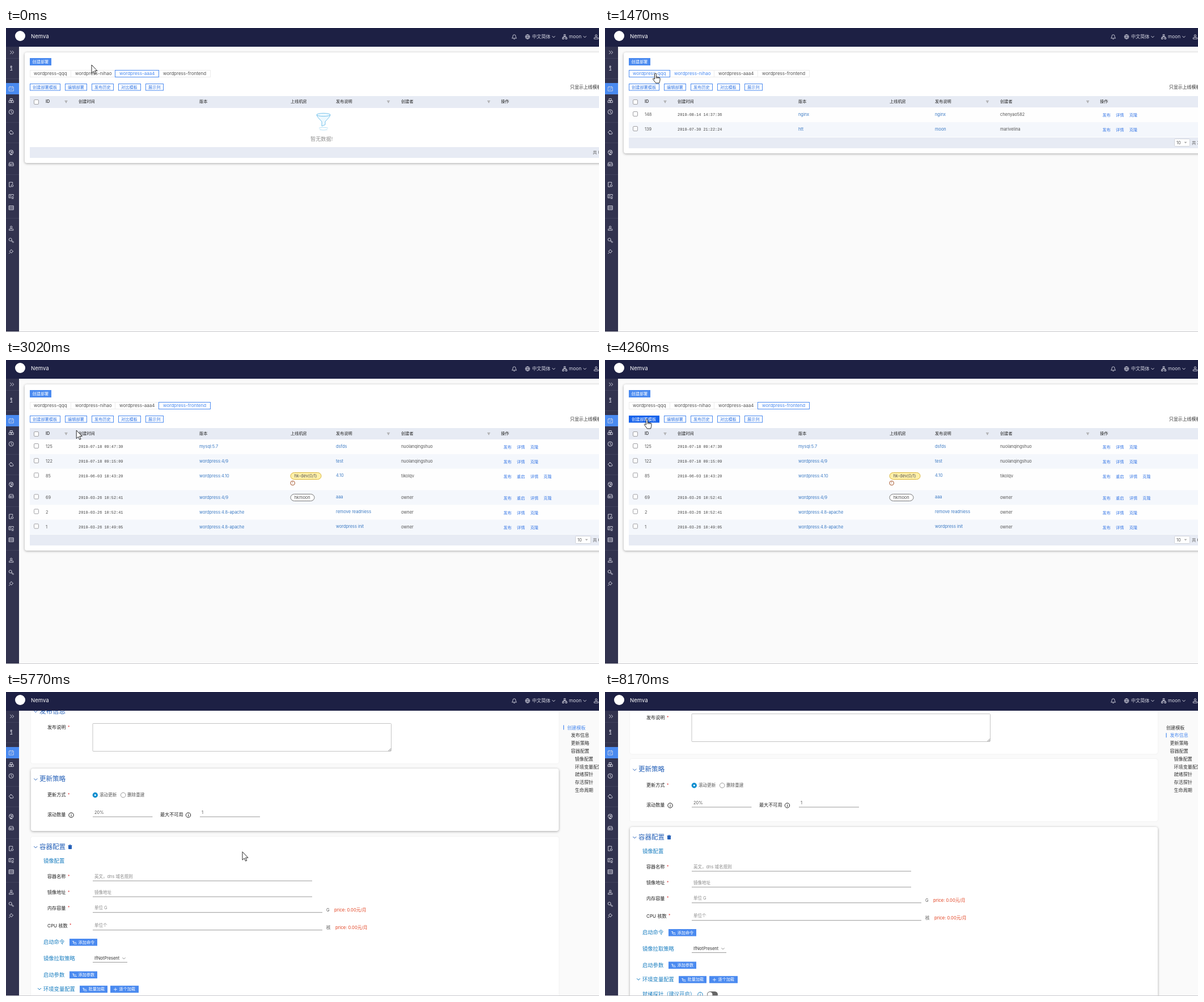
Animation, 1046 px wide and 536 px high, one loop 8.64 s. Source, as an HTML page:

```html
<!DOCTYPE html>
<html lang="en">
<head>
<meta charset="utf-8">
<style>
html, body { margin: 0; width: 100%; height: 100%; overflow: hidden; background: #fafafa }
svg { display: block; width: 1046px; height: 536px; font-family: Inter, 'Noto Sans CJK SC', 'Noto Sans CJK', sans-serif }
.mono { font-family: 'Liberation Mono', monospace }
.lift { filter: drop-shadow(0 1px 2px #0005) }
.flat { filter: drop-shadow(0 0 1px #0001) }
</style>
</head>
<body>
<svg id="stage" viewBox="0 0 1046 536"></svg>
<script>
const LOOP = 8640, BLUE = '#4a8af0', LINK = '#3d7bc4', HEAD = '#e7ebf4';
const stage = document.getElementById('stage');

// Text is placed by its left edge and vertical centre.
const text = (x, y, s, size = 7.4, fill = '#565656', extra = '') =>
  `<text x="${x}" y="${y + size * .36}" font-size="${size}" fill="${fill}" ${extra}>${s}</text>`;
const rect = (x, y, w, h, fill, extra = '') =>
  `<rect x="${x}" y="${y}" width="${w}" height="${h}" fill="${fill}" ${extra}/>`;
const box = (x, y, w, h, stroke, fill = '#fff', r = 0) =>
  rect(x + .5, y + .5, w - 1, h - 1, fill, `stroke="${stroke}" rx="${r}"`);
const circle = (x, y, r, fill, stroke = 'none') =>
  `<circle cx="${x}" cy="${y}" r="${r}" fill="${fill}" stroke="${stroke}"/>`;
const line = (x, y, x2, stroke = '#9a9a9a') => rect(x, y, x2 - x, 1, stroke);
const icon = (x, y, d, stroke = '#d8d9e4', width = .9, fill = 'none') =>
  `<path transform="translate(${x} ${y})" d="${d}" fill="${fill}" stroke="${stroke}" stroke-width="${width}"/>`;
const chevron = (x, y, color, s = 3) => icon(x, y, `M${-s} ${-s / 2}L0 ${s / 2}L${s} ${-s / 2}`, color, 1);
const ring = r => `M${-r} 0a${r} ${r} 0 1 0 ${2 * r} 0a${r} ${r} 0 1 0 ${-2 * r} 0`;

// Bursts of motion: start, end, number of pictures.
const bursts = [[380, 1220, 12], [1310, 2160, 12], [2250, 2470, 4], [2780, 3330, 8], [3560, 3940, 6],
  [4110, 4260, 2], [4490, 5290, 11], [5510, 5980, 7], [6610, 7460, 12], [7550, 8170, 9]];
const pointer = [[0, 151, 65], [380, 150, 67], [700, 140, 82], [1220, 92, 84], [1310, 89, 80], [1470, 89, 80],
  [1750, 150, 70], [2160, 312, 80], [2470, 312, 80], [2780, 285, 84], [3016, 124, 124], [3330, 70, 156],
  [3560, 70, 152], [3940, 71, 104], [4490, 76, 104], [4650, 181, 98], [5290, 417, 281], [6610, 417, 283],
  [7460, 412, 352], [7550, 440, 360], [8170, 1040, 545]];
const scrolling = [[5432, 0], [5510, 6], [5745, 62], [5980, 79]];

function snap(t) {
  let at = 0;
  for (const [start, end, n] of bursts) if (t >= start) {
    const step = (end - start) / (n - 1);
    at = start + Math.min(Math.floor((t - start) / step), n - 1) * step;
  }
  return at;
}
function sample(keys, t) {
  const i = keys.findIndex(k => k[0] > t);
  if (i === 0) return keys[0].slice(1);
  if (i < 0) return keys.at(-1).slice(1);
  const a = keys[i - 1], b = keys[i], u = (t - a[0]) / (b[0] - a[0]);
  return a.slice(1).map((v, j) => v + (b[j + 1] - v) * u);
}

const sideIcons = [
  [43, 'M-2-3L1 0L-2 3M1.5-3L4.5 0L1.5 3'],
  [71, 'M-1-4h2v2h-2zM-1.5-1H.7V3M-2 3.5h4'],
  [107, 'M-4-3h8v7h-8zM-2-4.5v2M2-4.5v2M-2 0L-.5 1.5L2.5-1'],
  [128, 'M-2-3.5h4v3.5h-4zM-4 0h4v3.5h-4zM0 0h4v3.5h-4z'],
  [148, ring(4) + 'M0-2.5V.5L2 1.5'],
  [184, 'M-2 3h5q2-2-.5-3.5q-1-3-3.5-2M-4 0L0-4M-4 0L0 3.5'],
  [219, ring(3.7) + 'M-3-2L3 1M2-3L-1 3M-2 4.5h4'],
  [240, 'M-4 0L-3-3h6l1 3v3h-8zM-4 0h8M-2 1.6h2'],
  [276, 'M2.5-1v-3h-6v8H0M0 2a1.8 1.8 0 1 0 3.6 0a1.8 1.8 0 1 0-3.6 0'],
  [297, 'M4-1v-2.5h-8v6h4M-2.5-1.5h3M-2.5.5h2M1 1.5a1.5 1.5 0 1 0 3 0a1.5 1.5 0 1 0-3 0M1.5 3v1.5M3.5 3v1.5'],
  [317, 'M-4-3.5h8v7h-8zM-4-1.2h8M-4 1.2h8'],
  [353, 'M-1.7-2a1.7 1.7 0 1 0 3.4 0a1.7 1.7 0 1 0-3.4 0M-3.7 3.7v-1.2q0-1.5 1.5-1.5h4.4q1.5 0 1.5 1.5v1.2z'],
  [374, 'M-4-1a2.5 2.5 0 1 0 5 0a2.5 2.5 0 1 0-5 0M1 .5L4.5 3.5L3.5 4.5L0 1.5'],
  [394, 'M0-3.5L3.5 0L2 .5L.5 3L-3-.5L-.5-2zM-1.5 1.5L-4 4']];

const chrome = () => rect(0, 33, 23, 503, '#32334f') + rect(0, 97, 23, 20, BLUE) +
  [53, 89, 166, 202, 258, 335].map(y => line(0, y, 23, '#41425d')).join('') +
  sideIcons.map(([y, d]) => icon(9.2, y, d)).join('') +
  rect(0, 0, 1046, 33, '#1d2044') + circle(25, 14, 9, '#fff') + text(44, 15, 'Nemva', 9.5, '#fff') +
  icon(896.5, 15.5, 'M-4 2.5Q-2.5 1-2.5-1a2.5 2.7 0 0 1 5 0Q2.5 1 4 2.5zM-1 4h2') +
  icon(920, 15.5, ring(3.8) + 'M-3.8 0h7.6M0-3.8Q-3.4 0 0 3.8Q3.4 0 0-3.8') +
  text(928, 15.5, '中文简体', 8.1, '#d8d9e4') + chevron(966, 15.5, '#d8d9e4', 2.5) +
  icon(985.5, 15.5, 'M-1.3-4h2.6v2.6h-2.6zM-4 1.4h2.6v2.6h-2.6zM1.4 1.4h2.6v2.6h-2.6zM0-1.4V0M-2.7 1.4V0h5.4v1.4') +
  text(993, 15, 'moon', 8.3, '#d8d9e4') + chevron(1021, 15.5, '#d8d9e4', 2.5) +
  icon(1041, 15.5, sideIcons[11][1]) + line(0, 535, 1046, '#c9c9cd');

// Row: centre, height, id, time, version, note, creator, can restart.
const shortRows = [[153, 26, 148, '2019-08-14 14:37:36', 'nginx', 'nginx', 'chenyao582'],
  [179, 26, 139, '2019-07-30 21:22:24', 'htt', 'moon', 'marivelina']];
const longRows = [[153, 26, 125, '2019-07-18 09:47:30', 'mysql:5.7', 'dsfds', 'nuolanqingshuo'],
  [179, 26, 122, '2019-07-18 09:15:09', 'wordpress:4/9', 'test', 'nuolanqingshuo'],
  [204.5, 38, 85, '2019-06-03 18:43:20', 'wordpress:4.10', '4.10', 'tikolqv', 1],
  [242.5, 26, 69, '2019-03-26 10:52:41', 'wordpress:4/9', 'aaa', 'owner', 1],
  [268.5, 26, 2, '2019-03-26 10:52:41', 'wordpress:4.8-apache', 'remove readniess', 'owner'],
  [294.5, 26, 1, '2019-03-26 10:49:05', 'wordpress:4.8-apache', 'wordpress init', 'owner']];

const check = y => box(49, y, 9, 9, '#a0a0a4', '#fff', 1.5);
const filter = x => icon(x, 130, 'M-2.3-1.7h4.6L.6.3V2L-.6 1.5V.3z', '#999', .6, '#bbb');

function tableRow([y, h, id, time, version, note, creator, restart], i) {
  const ops = restart ? ['发布', '重启', '详情', '克隆'] : ['发布', '详情', '克隆'];
  return rect(42, y - 13, 1004, h, i % 2 ? '#f4f7fc' : '#fefefe') + check(y - 6) +
    text(70, y - .3, id) + text(128, y, time, 6.88, '#444', 'class="mono"') +
    text(341, y - .3, version, 7.4, LINK) + text(582, y - .8, note, 7.4, LINK) + text(697, y - .3, creator) +
    ops.map((s, j) => text(877.5 + j * 23.6, y + .5, s, 7.2, '#3b7ae6')).join('');
}

function listScene(t) {
  const rows = t < 1310 ? [] : t < 2250 ? shortRows : longRows;
  const foot = [210, 193, 308][rows === longRows ? 2 : rows.length ? 1 : 0];
  const active = t < 1200 ? 2 : t < 2100 ? 0 : 3;
  const edges = [42, 115, 193, 270, 361];
  let s = rect(33, 43, 1030, foot - 15, '#fff', 'rx="4" class="lift"') +
    rect(42, 53, 38, 13, BLUE) + text(46.5, 59.2, '创建部署', 7.2, '#fff', 'font-weight="500"');
  const tab = (name, i) => box(edges[i] - (i && 1), 74, edges[i + 1] - edges[i] + (i && 1), 13, i === active ? BLUE : '#ececec') +
    text(edges[i] + 7, 80.3, 'wordpress-' + name, 8.06, i === active || i === 1 && t > 600 && t < 1800 ? BLUE : '#555');
  const names = ['qqq', 'nihao', 'aaa4', 'frontend'];
  s += names.map((n, i) => i === active ? '' : tab(n, i)).join('') + tab(names[active], active);
  [[42, 54, '创建部署模板'], [104, 39, '编辑部署'], [151, 39, '发布历史'], [198, 40, '对比模板'], [246, 32, '展示列']]
    .forEach(([x, w, label], i) => {
      const on = !i && t > 3900;
      s += box(x, 98, w, 12.5, on ? '#1763ec' : BLUE, on ? '#1763ec' : '#fff') +
        text(x + 5, 104.3, label, 7.2, on ? '#fff' : '#2f74e4');
    });
  s += text(995, 104.5, '只显示上线模板', 7.9, '#333') + rect(42, 120, 1004, 21, HEAD) + check(126) +
    [[70, 'ID'], [128, '创建时间'], [341, '版本'], [502, '上线机房'], [582, '发布说明'], [697, '创建者'], [873, '操作']]
      .map(([x, h]) => text(x, 129.2, h, 7.2, '#222', 'font-weight="500"')).join('') +
    [106, 674.5, 851.5].map(filter).join('') + rows.map(tableRow).join('');
  if (!rows.length)
    s += icon(560, 165, 'M-12-12Q-12-9-3 0V8L3 5.5V0Q12-9 12-12M-12-12a12 2.7 0 1 0 24 0a12 2.7 0 1 0-24 0', '#79c4ec', 1, '#edf8fe') +
      icon(560, 178, 'M-8-1.5Q0-4 8-1.5M-7 1Q0 3 7 1', '#b9e2f6', 1.2) + text(537, 196, '暂无数据!', 9.2, '#929292');
  if (rows === longRows)
    s += box(501.5, 198, 55, 13, '#d9b63c', '#fff0a8', 6.5) + text(508.5, 204.2, 'hk-dev(0/1)', 7.4) +
      circle(505.7, 217, 3.8, '#fff', '#a6562c') + text(504.7, 217, '!', 6, '#a6562c') +
      box(501.5, 236, 43, 13, '#777', '#fff', 6.5) + text(508.5, 242.2, 'hkmoon', 7.4);
  s += rect(42, foot, 1004, 19, HEAD);
  if (rows.length)
    s += box(1004, foot + 2, 28, 14, '#d0d3da', '#fff', 1) + text(1008, foot + 9, '10', 7.4) +
      icon(1024, foot + 9, 'M-2.5-1.3h5L0 1.5z', 'none', 0, '#aaa');
  return s + text(1035, foot + 9, '共 ' + rows.length, 7.4);
}

const title = (y, s) => chevron(52.3, y + 1, '#2560b8') + text(59, y, s, 11.5, '#2560b8');
const sub = (y, s) => text(66, y, s, 9.3, '#1b7fc0');
const label = (y, s, star) => text(73, y, s, 8.1, '#222') + (star ? text(star, y, '*', 7, '#d33') : '');
const info = (x, y, c = '#222') => circle(x, y, 4.2, 'none', c) + rect(x - .5, y - 2.4, 1, 1, c) + rect(x - .5, y - .6, 1, 3, c);
const button = (x, y, s, w = 49, plus) => rect(x, y - 6, w, 12.5, BLUE) +
  icon(x + 9, y + .5, plus ? 'M-3 0h6M0-3v6' : 'M-4-2h3M-2 0h5M-1 2.5h5M-2-2v4.5', '#fff', .8) +
  text(x + 15.5, y, s, 7.2, '#fff', 'font-weight="500"');

function formScene(t) {
  const [top] = sample(scrolling, t);
  const hover = t < 4900 ? 0 : t < 5900 ? 1 : 2;
  let s = [[78, 110], [197, 110], [317, 420]].map(([y, h], i) =>
    rect(44, y, 931, h, '#fff', `rx="4" class="${i === hover ? 'lift' : 'flat'}"`)).join('');
  s += text(45, 63.5, '创建模板', 12.8, '#333') + title(95.5, '发布信息') + label(124, '发布说明', 109) +
    box(152.5, 117, 527.5, 50, '#c4c4c4', '#fff', 1) + icon(677, 164, 'M-2.5 2L2-2.5M0 2L2 0', '#666', .8) +
    title(215, '更新策略') + label(243.5, '更新方式', 109) +
    circle(157.3, 243.7, 4.7, '#0f8fd0') + circle(157.3, 243.7, 1.5, '#fff') + text(165, 243.5, '滚动更新', 7.6) +
    circle(206.7, 243.7, 4.3, '#fff', '#999') + text(214, 243.5, '删除重建', 7.6) +
    label(278, '滚动数量') + info(115, 279) + text(156, 274, '20%') + line(153, 281.5, 258.5) +
    text(272, 278, '最大不可用', 8.1, '#222') + info(321.5, 279) + text(345, 274, '1') + line(342, 281.5, 448) +
    title(334.5, '容器配置') +
    icon(113, 335, 'M-2.5-2h5v5.5h-5zM-3.5-2.3h7M-1-3.7h2', '#2560b8', 1, '#2560b8') + sub(360, '镜像配置');
  [[387, '容器名称', '英文，dns 域名规则', 540], [415, '镜像地址', '镜像地址', 540],
   [442.7, '内存容量', '单位 G', 558, 'G', 579], [473.7, 'CPU 核数', '单位个', 558, '核', 581]]
    .forEach(([y, name, hint, end, unit, x]) => {
      s += label(y, name, unit === '核' ? 112 : 109) + text(156, y, hint, 7.5, '#8c8c8c') + line(153, y + 7.5, end);
      if (unit) s += text(565, y + 3.5, unit, 7.5) + text(x, y + 3.5, 'price: 0.00元/月', 7.6, '#e2401f');
    });
  s += sub(503, '启动命令') + button(112, 503, '添加命令') + sub(531.3, '镜像拉取策略') +
    text(156, 531, 'IfNotPresent', 7.44, '#333') + chevron(208, 531.5, '#888', 2.5) + line(153, 538, 214) +
    sub(560.3, '启动参数') + button(112, 560.5, '添加参数') +
    chevron(59, 585.5, '#1b7fc0') + sub(585.3, '环境变量配置') + button(130, 585.8, '批量加载') + button(184, 585.8, '逐个加载', 50, true) +
    sub(612, '就绪探针（建议开启）') + info(168, 612.5, '#1b7fc0') +
    rect(180, 607, 19, 10.5, '#666', 'rx="5.2"') + circle(185.2, 612.2, 4.3, '#fff');
  const current = t < 5900 ? 0 : 1;
  const nav = ['创建模板', '发布信息', '更新策略', '容器配置', '镜像配置', '环境变量配置', '就绪探针', '存活探针', '生命周期']
    .map((n, i) => text(i > 3 ? 1003.5 : i ? 996.5 : 990, 62.7 + i * 13.8, n, 8.1, i === current ? BLUE : '#333')).join('');
  return `<g transform="translate(0 ${-top})">${s}</g>` + nav +
    rect(983 + current * 6.5, 58.5 + current * 13.8, 1.2, 8, BLUE);
}

function cursor(t) {
  const [x, y] = sample(pointer, t);
  const hand = t > 600 && t < 1600 || t > 2050 && t < 2780 || t > 3900 && t < 4490;
  const halo = t === 4110 ? circle(x, y, 10.5, '#ff07') : '';
  return halo + icon(x, y, hand
    ? 'M-1.5 1.3a1.4 1.4 0 0 1 2.8 0V6l5.2 1.2q1.8.4 1.7 2.3l-.5 4-1 3.5H.5L-4.3 10.5q-.8-1.5.8-1.7l2 1.4zM1.3 6v3M3.7 6.6v2.5M6 7.2v2'
    : 'M0 0V14.5L3.4 11.4L5.6 16.4L7.8 15.4L5.6 10.5H10z', '#111', .9, '#fff');
}

let shown = -1;
function draw(now) {
  const t = snap(now % LOOP);
  if (t !== shown) {
    shown = t;
    stage.innerHTML = rect(0, 0, 1046, 536, '#fafafa') + (t < 4490 ? listScene(t) : formScene(t)) + chrome() + cursor(t);
  }
  requestAnimationFrame(() => draw(performance.now()));
}
draw(0);
</script>
</body>
</html>
```
